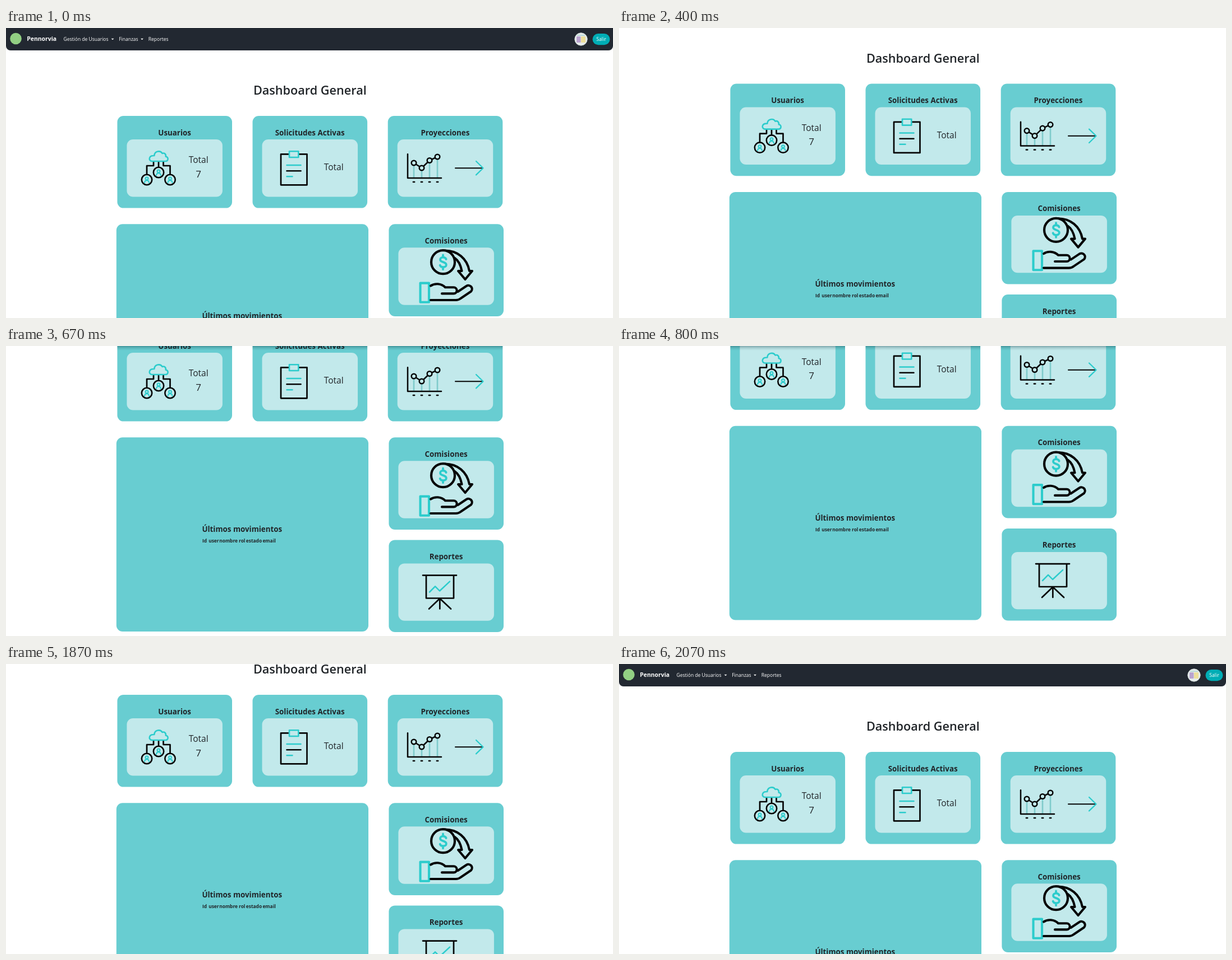
An HTML page with a canvas for the animation above (3.67 s loop, 1082x518 px).

```html
<!DOCTYPE html>
<html lang="es">
<head>
<meta charset="utf-8">
<title>Dashboard General</title>
<style>
  html, body { margin: 0; width: 100%; height: 100%; overflow: hidden; background: #fff; }
  canvas { display: block; width: 1082px; height: 518px; }
</style>
</head>
<body>
<canvas id="stage"></canvas>
<script>
const W = 1082, H = 518, LOOP = 3670;
const FONT = '"Open Sans", "Noto Sans", sans-serif';
const CARD = '#68cdd1', PANEL = '#c2e9eb', ACCENT = '#2ccccc', BLACK = '#050505', INK = '#212529';

// [time, scroll offset], each held until the next
const SCROLL = [
  [0, 0], [270, 5], [340, 31], [400, 57.4], [470, 82], [530, 107], [600, 148],
  [670, 187], [730, 207], [800, 207.5],
  [1730, 194.5], [1800, 153], [1870, 102], [1930, 51], [2000, 14], [2070, 0]
];

const canvas = document.getElementById('stage');
const ctx = canvas.getContext('2d');
const dpr = window.devicePixelRatio || 1;
canvas.width = W * dpr;
canvas.height = H * dpr;

function box(x, y, w, h, r, fill) {
  ctx.beginPath();
  ctx.roundRect(x, y, w, h, r);
  ctx.fillStyle = fill;
  ctx.fill();
}

function line(d, color, width, fill) {
  const path = new Path2D(d);
  if (fill) {
    ctx.fillStyle = fill;
    ctx.fill(path);
  }
  ctx.strokeStyle = color;
  ctx.lineWidth = width;
  ctx.stroke(path);
}

function disc(x, y, r, fill, stroke, width) {
  ctx.beginPath();
  ctx.arc(x, y, r, 0, Math.PI * 2);
  if (fill) {
    ctx.fillStyle = fill;
    ctx.fill();
  }
  if (stroke) {
    ctx.strokeStyle = stroke;
    ctx.lineWidth = width;
    ctx.stroke();
  }
}

function text(str, x, y, size, weight = 400, color = INK, align = 'left') {
  ctx.font = `${weight} ${size}px ${FONT}`;
  ctx.fillStyle = color;
  ctx.textAlign = align;
  ctx.fillText(str, x, y);
}

const centered = (str, x, y, size, weight) => text(str, x, y, size, weight, INK, 'center');

function card(x, y, title) {
  box(x, y, 204.6, 164.6, 11, CARD);
  box(x + 17, y + 42, 170.5, 102.4, 11, PANEL);
  centered(title, x + 102.2, y + 34.5, 13.35, 700);
}

function usersIcon() {
  line('M272 239V249M263 239V246H251V262M280.5 239V246H292.5V262', BLACK, 2.7);
  line('M260 238H284C290 238 290 230 284.8 229.8C285.5 225 282 222.5 278.5 224' +
       'C275.5 218.5 265 219 264.3 228C254 227.5 253.5 237 260 238Z', ACCENT, 2.6, PANEL);
  for (const [x, y] of [[272, 258], [251, 271], [292.5, 271]]) {
    disc(x, y, 9.2, PANEL, BLACK, 2.6);
    disc(x, y - 2, 2.4, null, ACCENT, 2);
    line(`M${x - 4} ${y + 5.2}C${x - 3.5} ${y} ${x + 3.5} ${y} ${x + 4} ${y + 5.2}`, ACCENT, 2);
  }
}

function clipboardIcon() {
  line('M490 225.3H536.5V280.3H490Z', BLACK, 2.7);
  line('M505 220.2H521.3V231H505Z', ACCENT, 2.6, PANEL);
  line('M500.5 245H525.5M500.5 265.2H510.5', ACCENT, 2.5);
  line('M500.5 255.2H525.5', BLACK, 2.5);
}

function chartIcon() {
  const dots = [[727, 241], [741, 250], [755, 236.5], [769, 230]];
  for (const [x, y] of dots) line(`M${x} ${y + 5}V267`, '#7fcbcb', 2.6);
  line('M716 225.2V268H776', BLACK, 2.5);
  line('M' + dots.map(p => p.join(' ')).join('L'), BLACK, 2.5);
  for (const [x, y] of dots) {
    disc(x, y, 4.3, PANEL, BLACK, 2.5);
    line(`M${x - 1.2} 275H${x + 1.2}`, BLACK, 2.5);
  }
  line('M801 250.2H849', BLACK, 2.1);
  line('M838 238L850.5 250.2L838 262.4', ACCENT, 2.3);
}

function coinHandIcon() {
  line('M781 397.6C805 397 822 412 826 434H831L818.5 449L806 434H812.5C810 421 806 415 800 411', BLACK, 4.1);
  disc(779, 418.2, 21, PANEL, BLACK, 4.2);
  line('M779 405.5V409M779 428V431.2M784.6 413C783 408.5 774 408.3 774 413.7' +
       'C774 419.5 784.8 416.7 784.8 423C784.8 428.5 775 428.4 773.6 423.7', ACCENT, 3.8);
  line('M738.5 455.6H754V489.7H738.5Z', ACCENT, 4.1);
  line('M757 460.5C764 455.5 776 456 783 463.2H798A5.6 5.6 0 0 1 798 474.4H777' +
       'M757 486H802C806 486 808 485 810.5 483L829 470.5C834 464.5 827 457 820.5 461L805.5 471', BLACK, 4.1);
}

function boardIcon() {
  line('M743 596.6H803M749 597V637.5H798V597M773.3 638V656.5M773.3 638L754 656.5M773.3 638L793 656.5', BLACK, 2.7);
  line('M755 626.5L765 616.3L773 624.5L791 607.6', ACCENT, 2.5);
}

function caret(x) {
  ctx.beginPath();
  ctx.moveTo(x - 2.4, 18.8);
  ctx.lineTo(x + 2.4, 18.8);
  ctx.lineTo(x, 21.2);
  ctx.fillStyle = '#fff';
  ctx.fill();
}

function navbar() {
  box(0, 0, W, 40, [0, 0, 8, 8], '#222831');
  disc(17.5, 19, 10.3, '#92cf83');
  text('Pennorvia', 37.3, 23, 10.4, 700, '#fff');
  text('Gestión de Usuarios', 102.6, 23.4, 8.5, 400, '#fff');
  caret(190);
  text('Finanzas', 201.2, 23.4, 8.5, 400, '#fff');
  caret(242.5);
  text('Reportes', 253.8, 23.4, 8.5, 400, '#fff');

  disc(1025, 20, 11.2, '#e6ecec', '#cfd8d6', 1);
  box(1017, 15, 7.5, 11, 1, '#b9a3cf');
  box(1025, 15, 8, 11, 1, '#ecdf9b');
  box(1018, 12, 14, 2, 1, '#b8d8d6');

  box(1045.5, 10, 31, 20.2, 10.1, '#00adb5');
  text('Salir', 1061, 23.4, 8.7, 400, '#fff', 'center');
}

function page() {
  navbar();
  centered('Dashboard General', 541.8, 119, 21.65, 600);

  card(198.4, 157, 'Usuarios');
  usersIcon();
  centered('Total', 343.2, 241.3, 15.5);
  centered('7', 343, 266.8, 17);

  card(439.5, 157, 'Solicitudes Activas');
  clipboardIcon();
  centered('Total', 584.2, 254.4, 15.5);

  card(680.7, 157, 'Proyecciones');
  chartIcon();

  box(196.8, 350.3, 449.2, 346.7, 11, CARD);
  text('Últimos movimientos', 349.4, 519.4, 13.35, 700);
  const cols = [['Id', 350], ['user', 361.2], ['nombre', 380.2], ['rol', 415], ['estado', 427.8], ['email', 457.4]];
  for (const [name, x] of cols) text(name, x, 538, 8.4, 700);

  card(682.4, 350.3, 'Comisiones');
  coinHandIcon();
  card(682.4, 533.4, 'Reportes');
  boardIcon();
}

// Soft shade along the top edge where cards pass under it
function topShade(y) {
  if (y < 157 || y > 322) return;
  const shade = ctx.createLinearGradient(0, 0, 0, 8);
  shade.addColorStop(0, 'rgba(0, 45, 55, .34)');
  shade.addColorStop(.5, 'rgba(0, 45, 55, .12)');
  shade.addColorStop(1, 'rgba(0, 45, 55, 0)');
  ctx.fillStyle = shade;
  for (const x of [198.4, 439.5, 680.7]) ctx.fillRect(x, 0, 204.6, 8);
}

function draw(now) {
  const t = now % LOOP;
  const y = SCROLL.findLast(([start]) => start <= t)[1];
  ctx.setTransform(dpr, 0, 0, dpr, 0, 0);
  ctx.fillStyle = '#fff';
  ctx.fillRect(0, 0, W, H);
  ctx.lineCap = 'round';
  ctx.lineJoin = 'round';
  ctx.save();
  ctx.translate(0, -y);
  page();
  ctx.restore();
  topShade(y);
}

const begin = performance.now();
function tick() {
  draw(performance.now() - begin);
  requestAnimationFrame(tick);
}
tick();
</script>
</body>
</html>
```
